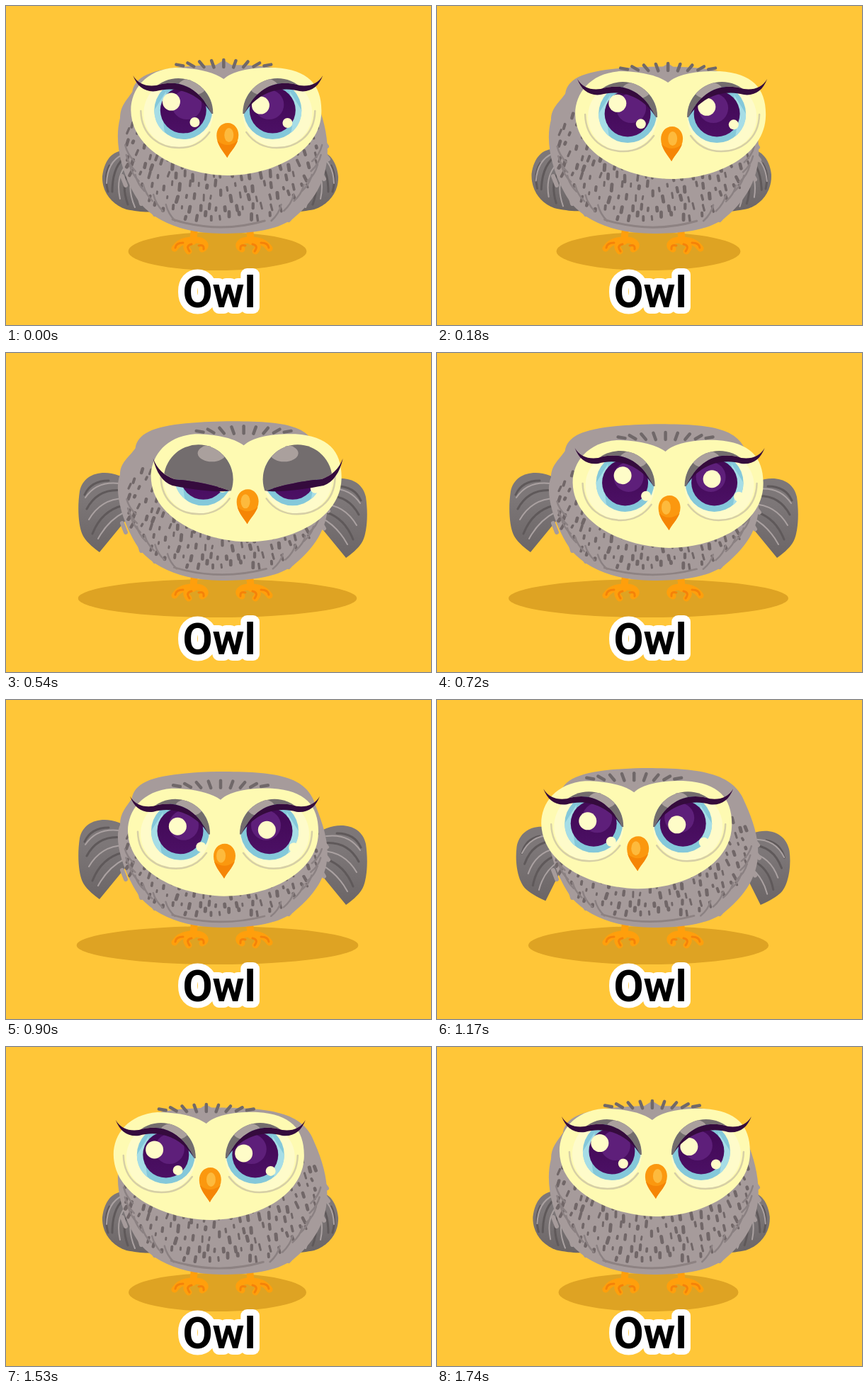
Write an HTML page that moves like this. It is 600 px wide and 450 px high and loops after 1770 ms.

```html
<!DOCTYPE html>
<html lang="en">
<head>
<meta charset="utf-8">
<title>Owl</title>
<style>
  html, body { margin: 0; width: 100%; height: 100%; overflow: hidden; background: #ffc638; }
  svg { display: block; width: 100vw; height: 100vh; }
  text { font: 700 61px Roboto, sans-serif; text-anchor: middle; stroke-linejoin: round; }
  .line { fill: none; stroke-linecap: round; stroke-linejoin: round; }
</style>
</head>
<body>
<svg viewBox="0 0 600 450">
  <defs>
    <clipPath id="eyeClip"><ellipse cx="241" cy="151" rx="49" ry="49"/></clipPath>
    <clipPath id="bodyClip"><path id="bodyClipPath"/></clipPath>
    <linearGradient id="pupilFill" x1="0" y1="0" x2="0" y2="1">
      <stop offset=".25" stop-color="#430a58"/>
      <stop offset="1" stop-color="#4c1065"/>
    </linearGradient>
    <linearGradient id="wingFill" x1="0" y1="0" x2="0" y2="1">
      <stop offset=".3" stop-color="#7d7778"/>
      <stop offset="1" stop-color="#6b6566"/>
    </linearGradient>
    <g id="foot" class="line">
      <path d="M266 314Q265 325 264 332" stroke="#ff9f0c" stroke-width="10"/>
      <path d="M264 330Q246 330 238 342M262 331Q250 337 258 346M263 331C278 328 287 338 277 343" stroke="#ff9f0c" stroke-width="9"/>
      <path d="M239 341Q240 334 250 334M259 346Q253 338 262 336M272 338Q280 336 279 343" stroke="#f58209" stroke-width="3"/>
    </g>
    <g id="wing">
      <path id="wingShape" fill="url(#wingFill)"/>
      <path id="wingDark" class="line" stroke="#5f595a" stroke-width="3"/>
      <path id="wingLight" class="line" stroke="#aaa1a1" stroke-width="2"/>
    </g>
    <g id="eyeWhite">
      <ellipse cx="241" cy="151" rx="49" ry="48" fill="#fefbca"/>
      <path class="line" d="M188 148C189 184 216 200 242 200C260 200 275 192 285 178" stroke="#d6cfa6" stroke-width="2.5"/>
      <g clip-path="url(#eyeClip)">
        <circle cx="248" cy="147" r="41" fill="#84c8da"/>
        <path d="M207 147A41 41 0 0 0 222 179Q217 160 224 120Z" fill="#a6dde6"/>
        <circle cx="248" cy="147" r="32.5" fill="url(#pupilFill)"/>
        <circle cx="253" cy="139" r="21" fill="#5e1f7a"/>
      </g>
    </g>
    <g id="eyeLid">
      <g clip-path="url(#eyeClip)">
        <clipPath id="lidClip"><path id="lidClipPath"/></clipPath>
        <g clip-path="url(#lidClip)">
          <rect x="180" y="90" width="120" height="120" fill="#736d6e"/>
          <ellipse cx="260" cy="114" rx="20" ry="12" fill="#aaa09d"/>
        </g>
      </g>
      <path id="lash" fill="#350b3d"/>
    </g>
  </defs>

  <rect width="600" height="450" fill="#ffc638"/>
  <ellipse id="shadow" cx="298.5" cy="346" ry="27" fill="#dea323"/>
  <use href="#foot"/>
  <use href="#foot" transform="matrix(-1 0 0 1 610 0)"/>
  <use href="#wing"/>
  <use id="rightWing" href="#wing"/>
  <path id="fringe" class="line" stroke="#a69b9b" stroke-width="6"/>
  <path id="body" fill="#a69b9b"/>
  <g clip-path="url(#bodyClip)">
    <g id="plumage" class="line"></g>
  </g>
  <g id="head">
    <g id="tufts" class="line" stroke="#706869" stroke-width="4.5"></g>
    <path fill="#fefab2" d="M305 103C318 91 345 86 378 87C425 90 444 112 443 150C442 205 375 239 310 239C247 238 175 205 174 147C174 118 195 90 236 87C263 87 290 92 305 103Z"/>
    <use href="#eyeWhite"/>
    <use href="#eyeWhite" transform="matrix(-1 0 0 1 622 0)"/>
    <g id="glints" fill="#fefcc8">
      <circle cx="231" cy="135" r="12.5"/><circle cx="264" cy="164" r="7"/>
      <circle cx="357" cy="140" r="12.5"/><circle cx="395" cy="165" r="7"/>
    </g>
    <use href="#eyeLid"/>
    <use href="#eyeLid" transform="matrix(-1 0 0 1 622 0)"/>
    <path d="M311 165C320 165 326 173 326 182C326 195 315 204 310 214C304 204 295 195 295 183C295 173 301 165 311 165Z" fill="#fb980f"/>
    <path d="M296 190Q310 202 325 190C321 200 314 206 310 214C305 206 299 200 296 190Z" fill="#f58506"/>
    <ellipse id="beakShine" cy="182" rx="6.5" ry="10" fill="#fdba3d"/>
  </g>
  <text x="301" y="425" fill="#fff" stroke="#fff" stroke-width="18">Owl</text>
  <text x="301" y="425" fill="#000">Owl</text>
</svg>
<script>
const LOOP = 1770;
const $ = id => document.getElementById(id);
const set = (id, name, value) => $(id).setAttribute(name, value);
const wave = (t, peak, harmonic = 1) => Math.cos(2 * Math.PI * harmonic * (t - peak) / LOOP);
const smooth = (t, from, to) => {
  const u = Math.min(1, Math.max(0, (t - from) / (to - from)));
  return u * u * (3 - 2 * u);
};

// Blends two paths that share the same commands.
function blend(a, b, k) {
  const goal = b.match(/[\d.]+/g);
  let i = 0;
  return a.replace(/[\d.]+/g, n => (+n + (goal[i++] - n) * k).toFixed(2));
}

const wingPoses = {
  wingShape: [
    'M185 207C160 198 140 208 136 240C135 262 149 280 170 287C185 290 205 292 212 289L200 215Z',
    'M180 185C150 160 110 165 104 195C100 222 103 250 110 260C115 268 125 276 132 281L178 225Z'],
  wingDark: [
    'M170 212Q150 225 150 262M178 230Q160 245 172 280M146 225Q138 240 144 262',
    'M165 194Q130 190 114 220M166 215Q135 222 122 255M145 180Q120 180 111 200'],
  wingLight: [
    'M164 210Q143 220 142 250M172 222Q154 240 161 272M180 240Q170 255 182 284',
    'M160 184Q128 180 112 204M166 205Q134 206 117 235M168 224Q144 236 130 262']
};
const lashTop = [
  'M177 98C184 110 196 114 210 112C245 101 272 118 288 152',
  'M177 138C182 155 190 168 205 178C235 191 268 191 284 178'];
const lashUnder = [
  'C270 122 238 112 210 120C194 122 183 114 177 98Z',
  'C266 204 228 203 200 188C188 178 180 160 177 138Z'];
const lidRest = ['L300 152L300 80L177 80Z', 'L300 178L300 80L177 80Z'];

const stroke = (x, y, angle, length, width) =>
  `<path d="M0 ${-length / 2}V${length / 2}" stroke-width="${width}" transform="translate(${x} ${y}) rotate(${angle})"/>`;

function buildPlumage() {
  let seed = 7, spots = '', streaks = '';
  const jitter = size => {
    seed = (seed * 16807) % 2147483647;
    return (seed / 2147483647 - 0.5) * size;
  };
  for (let row = 0; row < 11; row++) {
    for (let col = -11; col <= 11; col++) {
      const x = 305 + (col + row % 2 / 2) * 13 + jitter(7);
      const y = 152 + row * 14.5 + jitter(10);
      const reach = ((x - 305) / 138) ** 2 + ((y - 198) / 113) ** 2;
      if (reach < 1) spots += stroke(x, y, (305 - x) * 0.16 + jitter(16), 7 - reach * 2 + jitter(6), 4 + jitter(2.4));
    }
  }
  for (let i = 0; i < 7; i++) {
    const y = 196 + i * 14, inset = i * i * 1.6;
    streaks += `<path d="M${168 + inset} ${y}q3 13 13 23M${446 - inset} ${y}q-3 13 -14 23"/>`;
  }
  $('plumage').innerHTML =
    `<g stroke="#716768">${spots}</g>` +
    `<g stroke="#8b8182" stroke-width="2.5">${streaks}</g>` +
    '<path d="M235 301Q300 322 365 303" stroke="#8d8282" stroke-width="3"/>';
}

function buildTufts() {
  let marks = '<path d="M283 96L305 82L327 96" stroke="#a69b9b" stroke-width="10"/>';
  for (let i = -4; i <= 4; i++) {
    marks += stroke(305 + i * 15.5, 81 + Math.abs(i) * 0.6, i * 20, 10, 4.5);
  }
  $('tufts').innerHTML = marks;
}

function bodyPath(dx, top) {
  const crown = 300 + dx * 0.4, shoulder = 178 + dx * 0.15;
  return `M${crown} ${top}C${382 + dx * 0.5} ${top} ${426 + dx * 0.25} ${top + 5} ${438 + dx * 0.1} ${top + 50}` +
    `C460 ${top + 105} 467 250 405 300C380 318 340 321 305 321C255 321 215 307 190 279` +
    `C170 252 150 200 161 ${top + 75}C161 ${top + 58} ${shoulder - 8} ${top + 50} ${shoulder} ${top + 38}` +
    `C${shoulder + 4} ${top + 12} ${shoulder + 37} ${top + 2} ${crown} ${top}Z`;
}

function draw(t) {
  const dx = 1 + 32 * wave(t, 432);
  const dy = 19 - 19 * wave(t, -30);
  const radius = 161 + 42.8 * wave(t, 772) + 1.84 * wave(t, 772, 2) - 8.6 * wave(t, 772, 3);
  const spread = Math.min(1, Math.max(0, (radius - 126) / 70));
  const lift = 1 - (1 - spread) ** 1.35;
  const blink = smooth(t, 190, 330) - smooth(t, 470, 630);

  set('shadow', 'rx', radius);
  for (const [id, [down, up]] of Object.entries(wingPoses)) set(id, 'd', blend(down, up, lift));
  set('rightWing', 'transform', `matrix(-1 0 0 1 ${605 + 7 * lift} ${8 * lift})`);

  const outline = bodyPath(dx, 83 + dy * 0.48);
  set('body', 'd', outline);
  set('bodyClipPath', 'd', outline);
  const sag = dy * 0.25;
  set('fringe', 'd', `M444 ${186 + sag}l9 12M446 ${204 + sag}l9 12M442 ${232 + sag / 2}l7 12` +
    'M408 292l-9 10M386 301l-7 8M188 268l3 11M204 284l6 10M164 240l5 13');
  set('plumage', 'transform', `translate(${dx * 0.08} ${320 * dy * 0.003}) scale(1 ${1 - dy * 0.003})`);

  set('head', 'transform', `translate(${dx} ${dy})`);
  set('glints', 'transform', `translate(${6.8 + 7 * wave(t, 800)} ${2.6 + 6 * wave(t, 1200)})`);
  set('beakShine', 'cx', 309 - 3.5 * wave(t, 850));

  const top = blend(...lashTop, blink);
  set('lash', 'd', top + blend(...lashUnder, blink));
  set('lidClipPath', 'd', top + blend(...lidRest, blink));
}

buildPlumage();
buildTufts();
const start = performance.now();
function tick() {
  draw((performance.now() - start) % LOOP);
  requestAnimationFrame(tick);
}
tick();
</script>
</body>
</html>
```
